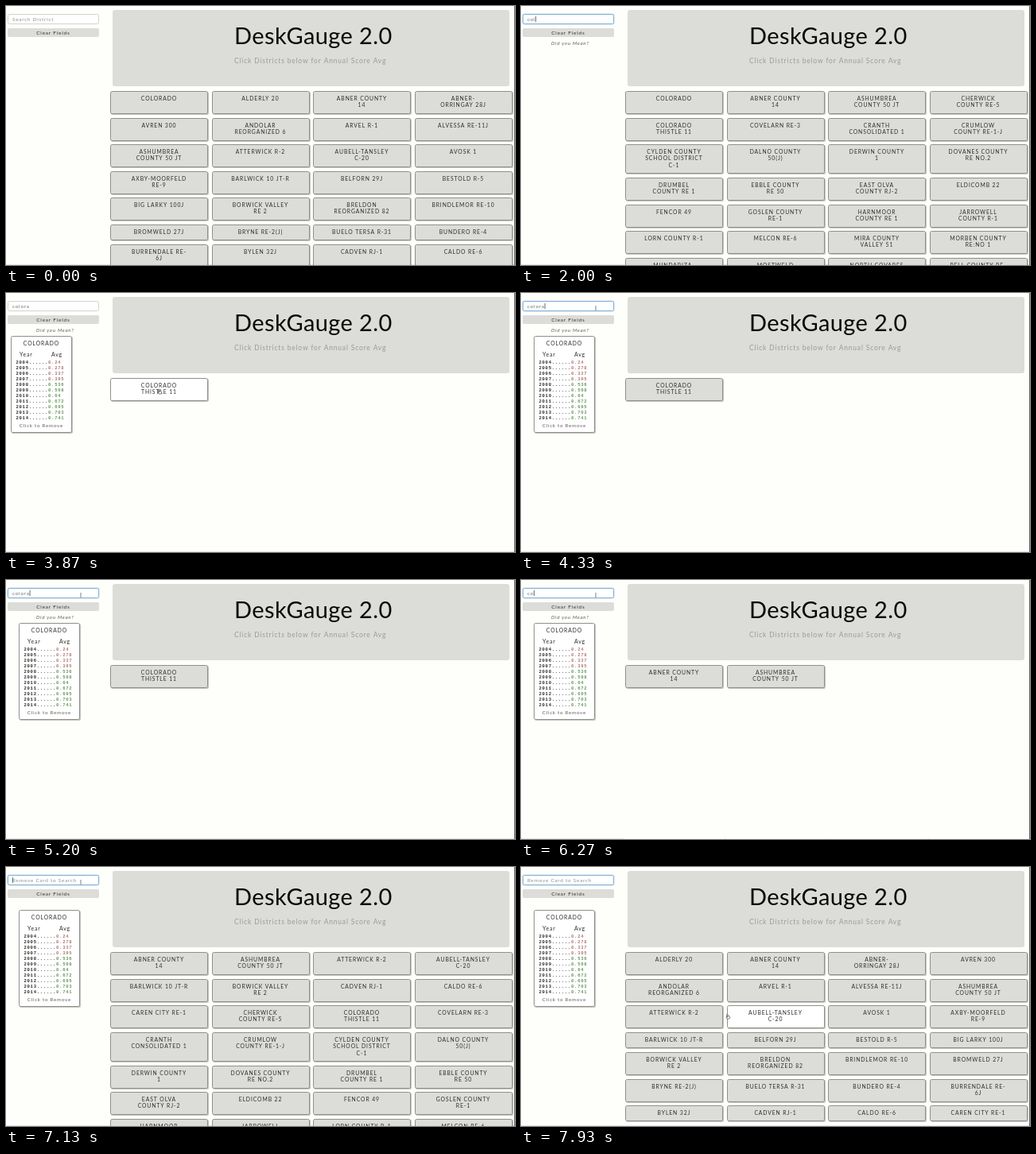
An HTML page with a canvas for the animation above (8000 ms loop, 640 by 326 pixels).

```html
<!DOCTYPE html>
<html lang="en">
<head>
<meta charset="utf-8">
<title>DeskGauge 2.0</title>
<style>
  html, body { margin: 0; width: 100%; height: 100%; overflow: hidden; background: #fefefb; }
  canvas { display: block; width: 640px; height: 326px; }
</style>
</head>
<body>
<canvas id="stage"></canvas>
<script>
const W = 640, H = 326, LOOP = 8000;
const canvas = document.getElementById('stage');
const ctx = canvas.getContext('2d');
const dpr = window.devicePixelRatio || 1;
canvas.width = W * dpr;
canvas.height = H * dpr;

const SANS = 'Lato, "Open Sans", sans-serif';
const MONO = '"Liberation Mono", "DejaVu Sans Mono", monospace';
const PAGE = '#fefefb', FILL = '#dcdcd8', EDGE = '#8f8f8c', INK = '#2e2e2c';

// "|" marks a line break inside a tile
const districts = `COLORADO;ALDERLY 20;ABNER COUNTY|14;ABNER-|ORRINGAY 28J;AVREN 300;
ANDOLAR|REORGANIZED 6;ARVEL R-1;ALVESSA RE-11J;ASHUMBREA|COUNTY 50 JT;ATTERWICK R-2;
AUBELL-TANSLEY|C-20;AVOSK 1;AXBY-MOORFELD|RE-9;BARLWICK 10 JT-R;BELFORN 29J;BESTOLD R-5;
BIG LARKY 100J;BORWICK VALLEY|RE 2;BRELDON|REORGANIZED 82;BRINDLEMOR RE-10;BROMWELD 27J;
BRYNE RE-2(J);BUELO TERSA R-31;BUNDERO RE-4;BURRENDALE RE-|6J;BYLEN 32J;CADVEN RJ-1;
CALDO RE-6;CAREN CITY RE-1;CHERWICK|COUNTY RE-5;COLORADO|THISTLE 11;COVELARN RE-3;
CRANTH|CONSOLIDATED 1;CRUMLOW|COUNTY RE-1-J;CYLDEN COUNTY|SCHOOL DISTRICT|C-1;
DALNO COUNTY|50(J);DERWIN COUNTY|1;DOVANES COUNTY|RE NO.2;DRUMBEL|COUNTY RE 1;
EBBLE COUNTY|RE 50;EAST OLVA|COUNTY RJ-2;ELDICOMB 22;FENCOR 49;GOSLEN COUNTY|RE-1;
HARNMOOR|COUNTY RE 1;JARROWELL|COUNTY R-1;LORN COUNTY R-1;MELCON RE-6;
MIRA COUNTY|VALLEY 51;MORBEN COUNTY|RE:NO 1;MUNDARIZA-|CORVEN RE-1;MOSTWELD|COUNTY RE-1J;
NORTH COVARES|RE-1J;PELL COUNTY RE-|2;PIRN COUNTY|60`
  .split(';').map(s => s.trim().split('|'));

const scores = [0.24, 0.278, 0.337, 0.395, 0.536, 0.598, 0.64, 0.672, 0.695, 0.703, 0.741];

// [time, value] steps
const typed = [[0, ''], [1270, 'c'], [1800, 'co'], [2000, 'col'], [2130, 'colo'], [2270, 'color'],
  [2330, 'colora'], [5530, 'color'], [5770, 'colo'], [6000, 'col'], [6270, 'co'], [6800, 'c'], [7070, '']];
const filters = [[0, ''], [1400, 'c'], [1800, 'co'], [2130, 'col'], [6270, 'co'], [6930, 'c'], [7200, '']];
const focus = [[0, false], [730, true], [3070, false], [4180, true]];
const PICK = 3070, ERASE = 5530, REGROW = 6270, FADE = 800;

// [start, end, from, to]
const moves = [
  [2870, 3050, [94, 19], [193, 124]],
  [3900, 4170, [193, 124], [94, 19]],
  [7280, 7870, [94, 19], [260, 188]]
];

const clamp = v => Math.max(0, Math.min(1, v));
const ramp = (t, a, b) => clamp((t - a) / (b - a));
const smooth = p => p * p * (3 - 2 * p);
const fadeIn = (t, start) => Math.pow(ramp(t, start, start + FADE), 2.6);
const stepAt = (steps, t) => steps.filter(s => s[0] <= t).pop()[1];

function pointerAt(t) {
  const m = moves.filter(v => v[0] <= t).pop();
  if (!m) return null;
  const e = smooth(ramp(t, m[0], m[1]));
  return m[2].map((v, i) => v + (m[3][i] - v) * e);
}

function text(str, x, y, size, o = {}) {
  ctx.font = `${o.style || ''} ${o.weight || 400} ${size}px ${o.family || SANS}`;
  ctx.letterSpacing = (o.gap || 0) + 'px';
  ctx.fillStyle = o.color || INK;
  const w = ctx.measureText(str).width;
  ctx.fillText(str, o.center ? x - (w - (o.gap || 0)) / 2 : x, y);
  return w;
}

function box(x, y, w, h, r, fill, edge) {
  ctx.beginPath();
  ctx.roundRect(x, y, w, h, r);
  ctx.fillStyle = fill;
  ctx.fill();
  if (edge) {
    ctx.strokeStyle = edge;
    ctx.lineWidth = 1;
    ctx.stroke();
  }
}

function panel(x, y, w, h, fill) {
  box(x + 1, y + 1, w, h, 2, 'rgba(90,90,80,.35)');
  box(x + 0.5, y + 0.5, w - 1, h - 1, 2, fill, EDGE);
}

// Covers an area with page colour, so that what lies there shows at the given opacity
function veil(x, y, w, h, opacity) {
  if (opacity >= 1) return;
  ctx.globalAlpha = 1 - opacity;
  ctx.fillStyle = PAGE;
  ctx.fillRect(x - 1, y - 1, w + 3, h + 3);
  ctx.globalAlpha = 1;
}

function header() {
  box(134, 5, 499, 96, 3, FILL);
  text('DeskGauge 2.0', 287, 48, 29, { gap: 0.4, color: '#080808' });
  text('Click Districts below for Annual Score Avg', 287, 71.5, 8.5, { gap: 0.82, color: '#9a9a98' });
}

function sidebar(t) {
  const value = stepAt(typed, t), focused = stepAt(focus, t);
  if (focused) box(1.5, 9.5, 116, 14, 3, 'rgba(120,175,225,.4)');
  box(2.5, 10.5, 114, 12, 2, '#fff', focused ? '#7fb0d8' : '#d3d3cc');
  const hint = t > PICK ? 'Remove Card to Search' : 'Search District';
  const w = text(value || hint, 8, 19, 6.4, { gap: 0.75, color: value ? '#6c6c68' : '#8c8c86' });
  if (focused && t % 1000 < 500) {
    ctx.fillStyle = INK;
    ctx.fillRect(value ? 8 + w : 8, 13, 0.7, 7);
  }
  box(2, 28, 115, 11, 2, FILL);
  text('Clear Fields', 59, 35.8, 6.4, { gap: 0.8, center: true });
  if (value.length > 1) text('Did you Mean?', 38, 49, 6.2, { gap: 0.7, style: 'italic', color: '#5c5c58' });
}

function scoreCard(x, y, opacity) {
  ctx.save();
  ctx.translate(x, y);
  panel(0, 0, 77, 122, '#fff');
  text('COLORADO', 38, 12, 6.8, { gap: 0.9, center: true });
  text('Year', 11, 25.5, 7, { gap: 0.8 });
  text('Avg', 51, 25.5, 7, { gap: 0.8 });
  scores.forEach((v, i) => {
    const o = { gap: 0.7, weight: 700, family: MONO };
    const w = text(2004 + i + '......', 6.5, 35.2 + i * 7, 5.6, o);
    text(String(v), 6.5 + w, 35.2 + i * 7, 5.6, { ...o, color: v < 0.5 ? '#b07a78' : '#679a5c' });
  });
  text('Click to Remove', 38, 114.5, 6.2, { gap: 0.75, center: true, color: '#5c5c58' });
  veil(0, 0, 77, 122, opacity);
  ctx.restore();
}

function cards(t) {
  if (t < PICK) return;
  scoreCard(6 + 10 * smooth(ramp(t, 3900, 4330)), 54, fadeIn(t, PICK));
  // erasing text adds a fresh copy below, which then takes the first one's place
  const copy = fadeIn(t, t < REGROW ? ERASE : REGROW);
  if (copy > 0 && copy < 1) scoreCard(16, 187, copy);
}

function tiles(t, mouse) {
  const query = stepAt(filters, t).toUpperCase();
  const shown = districts.filter((d, i) => d.join(' ').includes(query) && !(i === 0 && t >= PICK));
  const opacity = t < REGROW ? 1 : fadeIn(t, REGROW);
  let over = false;
  for (let i = 0, y = 107; i < shown.length && y < H; i += 4) {
    const row = shown.slice(i, i + 4);
    const h = 12 + 8.3 * Math.max(...row.map(d => d.length));
    row.forEach((lines, c) => {
      const x = 131 + c * 127.5, left = Math.round(x), top = Math.round(y);
      const hover = mouse && mouse[0] >= x && mouse[0] <= x + 123 && mouse[1] >= y && mouse[1] <= y + h;
      over = over || hover;
      panel(left, top, 123, Math.round(h), hover ? '#fff' : FILL);
      lines.forEach((s, n) => text(s, x + 61, top + 12 + n * 8.3, 6.8, { gap: 0.9, center: true }));
      if (i + c > 1) veil(left, top, 123, Math.round(h), opacity);
    });
    y += h + 5;
  }
  return over;
}

function cursor([x, y], hand) {
  ctx.save();
  ctx.translate(x, y);
  ctx.strokeStyle = '#4a4a48';
  ctx.fillStyle = '#fff';
  ctx.lineWidth = 0.7;
  ctx.beginPath();
  if (x < 117 && y > 10 && y < 23) {
    ctx.moveTo(0, -3);
    ctx.lineTo(0, 3);
  } else if (hand) {
    ctx.roundRect(-1.5, -0.5, 4, 3.5, 1);
    ctx.roundRect(-1.2, -3, 1.2, 4, 0.6);
    ctx.fill();
  } else {
    ctx.moveTo(0, -3);
    ctx.lineTo(0, 3);
    ctx.lineTo(1.4, 1.6);
    ctx.lineTo(3.5, 1.5);
    ctx.closePath();
    ctx.fill();
  }
  ctx.stroke();
  ctx.restore();
}

function draw(t) {
  ctx.setTransform(dpr, 0, 0, dpr, 0, 0);
  ctx.fillStyle = PAGE;
  ctx.fillRect(0, 0, W, H);
  ctx.fillStyle = '#e9e9f2';
  ctx.fillRect(0, H - 1, W, 1);
  const mouse = pointerAt(t);
  header();
  sidebar(t);
  cards(t);
  const over = tiles(t, mouse);
  if (mouse) cursor(mouse, over);
  ctx.fillStyle = '#66665c';
  ctx.fillRect(W - 1, 0, 1, H);
}

const begin = performance.now();
function tick() {
  draw((performance.now() - begin) % LOOP);
  requestAnimationFrame(tick);
}
tick();
</script>
</body>
</html>
```
